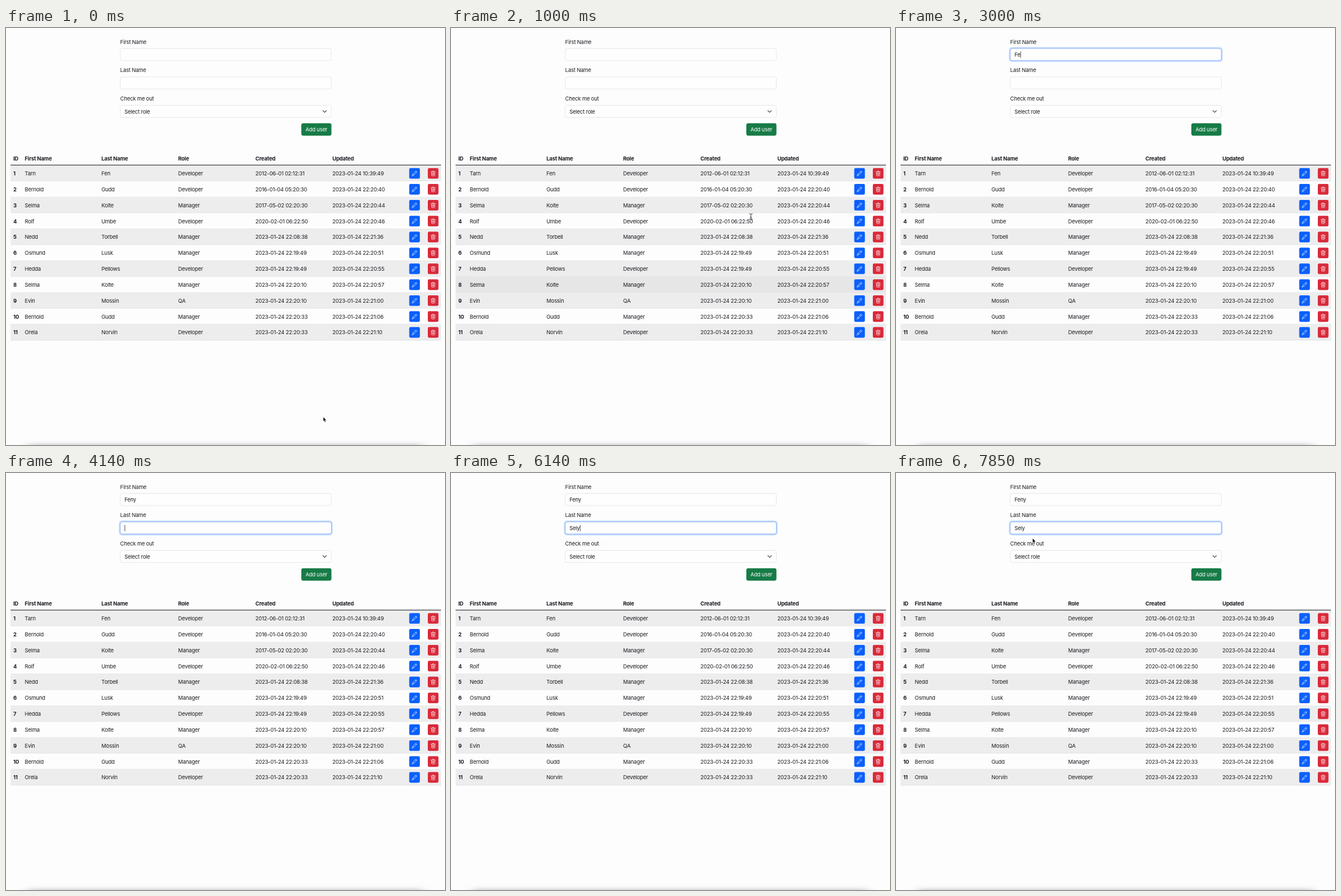
These frames come from a looping animation (767 by 730 pixels, 8 s). An HTML page:

```html
<!DOCTYPE html>
<html lang="en">
<head>
<meta charset="utf-8">
<title>User table</title>
<style>
html, body { margin: 0; width: 100%; height: 100%; overflow: hidden; background: #fdfdfe; }
svg { display: block; width: 767px; height: 730px; }
text { font: 9.3px Inter, "Liberation Sans", sans-serif; letter-spacing: -.02em; fill: #1a1b1f; }
.b { font-weight: 700; }
.w { fill: #fff; }
.field { fill: #fefefe; stroke: #dfe1e5; stroke-width: .8; }
.glow { fill: none; stroke: #c3daff; stroke-width: 2.3; }
.edge { fill: none; stroke: #86b4fb; stroke-width: .9; }
.icon { fill: none; stroke: #fff; stroke-width: 1.15; stroke-linejoin: round; stroke-linecap: round; }
</style>
</head>
<body>
<svg id="stage" viewBox="0 0 767 730"></svg>
<script>
const users = [
  ['Tarn', 'Fen', 'Developer', '2012-06-01 02:12:31', '10:39:49'],
  ['Bernold', 'Gudd', 'Developer', '2016-01-04 05:20:30', '22:20:40'],
  ['Selma', 'Kolte', 'Manager', '2017-05-02 02:20:30', '22:20:44'],
  ['Rolf', 'Umbe', 'Developer', '2020-02-01 06:22:50', '22:20:46'],
  ['Nedd', 'Torbell', 'Manager', '2023-01-24 22:08:38', '22:21:36'],
  ['Osmund', 'Lusk', 'Manager', '2023-01-24 22:19:49', '22:20:51'],
  ['Hedda', 'Pellows', 'Developer', '2023-01-24 22:19:49', '22:20:55'],
  ['Selma', 'Kolte', 'Manager', '2023-01-24 22:20:10', '22:20:57'],
  ['Evin', 'Mossin', 'QA', '2023-01-24 22:20:10', '22:21:00'],
  ['Bernold', 'Gudd', 'Manager', '2023-01-24 22:20:33', '22:21:06'],
  ['Orela', 'Norvin', 'Developer', '2023-01-24 22:20:33', '22:21:10']
];
const cols = [12.7, 32.8, 166.8, 300.8, 435.8, 570.3];
const heads = ['ID', 'First Name', 'Last Name', 'Role', 'Created', 'Updated'];
const TOP = 240.6, ROW = 27.84;

const text = (x, y, s, cls = '', id = '') => `<text x="${x}" y="${y}" class="${cls}" id="${id}">${s}</text>`;
const rect = (x, y, w, h, r, attrs) => `<rect x="${x}" y="${y}" width="${w}" height="${h}" rx="${r}" ${attrs}/>`;

function field(label, y, id) {
  return text(199.6, y - 8.2, label) +
    rect(199.6, y, 368.8, 21.2, 3.4, 'class="field"') +
    `<g id="${id}Focus">` + rect(198.4, y - 1.2, 371.2, 23.6, 4.4, 'class="glow"') +
    rect(199.6, y, 368.8, 21.2, 3.4, 'class="edge"') + '</g>';
}

function button(x, mid, color, icon) {
  return rect(x, mid - 9.3, 18.6, 18.6, 2.4, `fill="${color}"`) +
    `<use href="#${icon}" transform="translate(${x + 4.65} ${mid - 4.65}) scale(.58)"/>`;
}

function row(user, i) {
  const y = TOP + i * ROW, mid = y + ROW / 2, base = mid + 3.5;
  const cells = [i + 1, ...user.slice(0, 4), '2023-01-24 ' + user[4]];
  return rect(8, y, 752, ROW, 0, `fill="${i % 2 ? '#fdfdfe' : '#ededee'}" class="row"`) +
    rect(8, y + ROW - .6, 752, .7, 0, 'fill="#dcdee1"') +
    cells.map((c, k) => text(cols[k], base, c, k ? '' : 'b')).join('') +
    button(704.5, mid, '#0b60fb', 'pencil') + button(737, mid, '#d92a3a', 'trash');
}

const stage = document.getElementById('stage');
stage.innerHTML = `
<defs>
  <path id="pencil" class="icon" d="M.8 15.2l2-5L12.4.8l2.8 2.8L5.8 13zM10.6 2.8l2.6 2.6M3 10.2l2.8 2.8"/>
  <path id="trash" class="icon" d="M2.8 4l.5 10.2q.1 1.2 1.3 1.2h6.8q1.2 0 1.3-1.2L13.2 4M1.6 3.4h12.8M5.6 3V1h4.8v2M5.6 6.4v6M8 6.4v6M10.4 6.4v6"/>
  <filter id="soft" x="-10%" y="-100%" width="120%" height="300%"><feGaussianBlur stdDeviation="9 4"/></filter>
</defs>
<rect width="767" height="730" fill="#fdfdfe"/>
<rect x="38" y="730" width="690" height="20" fill="#b4b4b8" filter="url(#soft)"/>
${field('First Name', 35.8, 'first')}${field('Last Name', 85.6, 'last')}
${text(199.6, 127.2, 'Check me out')}${rect(199.6, 135.4, 368.8, 21.2, 3.4, 'class="field"')}
${text(207, 149.5, 'Select role')}
<path d="M553.6 144.6l3.1 3.1 3.1-3.1" fill="none" stroke="#343a40" stroke-width="1.15" stroke-linecap="round" stroke-linejoin="round"/>
${rect(516, 166.8, 52.6, 21.6, 3.4, 'fill="#177b46"')}${text(523.2, 181, 'Add user', 'w')}
${heads.map((h, k) => text(cols[k], 231.5, h, 'b')).join('')}
${users.map(row).join('')}
<rect x="8" y="239.4" width="752" height="1.2" fill="#303236"/>
<rect id="mark" x="206.6" y="91" width="18.6" height="11" fill="#d6d7d9"/>
${text(207, 49.8, '', '', 'firstText')}${text(207, 99.7, '', '', 'lastText')}
<rect id="caret" width=".8" height="11" fill="#222"/>
<g id="tip">${rect(202, 102.4, 36.4, 13, 4, 'fill="#202022"')}
  <text x="206.4" y="111.5" class="w" style="font-size:7.6px">Self</text>
  <path d="M229.7 107.2l3.8 3.8m0-3.8l-3.8 3.8" stroke="#b5b5b7" stroke-width=".8"/></g>
<g id="pointer">
  <circle id="ring" r="9.6" fill="#fff" fill-opacity=".4" stroke="#26272b" stroke-width="1.3"/>
  <path id="beam" d="M-2.8-4.8q2.3 0 2.8 1.2q.5-1.2 2.8-1.2M0-3.8v7.6M-2.8 4.8q2.3 0 2.8-1.2q.5 1.2 2.8 1.2M-1.2 1.4h2.4" fill="none" stroke="#222" stroke-width=".95"/>
  <path id="arrow" d="M0 0v8l1.8-1.6 1.3 3 1.5-.7-1.3-2.8h2.5z" fill="#000" stroke="#fff" stroke-width=".6"/>
</g>`;

const $ = id => document.getElementById(id);
const rows = stage.querySelectorAll('.row');
const show = (id, v) => $(id).setAttribute('opacity', +v);

const TICK = 8000 / 56;
// tick, x, y, shape
const path = [
  [0, 554.2, 680.8, 'arrow'], [5, 561, 505, 'beam'], [6, 563.8, 447, 'beam'],
  [7, 524, 330, 'beam'], [8, 442, 200, 'arrow'], [9, 340, 112, 'arrow'],
  [10, 262, 63, 'arrow'], [11, 232, 49.5, 'beam'], [12, 231.2, 48.8, 'beam'], [19, 0, 0, ''],
  [47, 271, 76.6, 'beam'], [48, 270.2, 76.8, 'beam'], [49, 261, 88, 'beam'], [50, 247, 101, 'beam'],
  [51, 238, 107, 'arrow'], [52, 232, 108, 'arrow'], [53, 231, 108.5, 'arrow'],
  [54, 233, 110, 'arrow'], [55, 238.6, 114.2, 'arrow']
];
const clicks = { 11: .5, 12: 1, 13: .5, 53: 1 };
const typed = (word, ticks, n) => word.slice(0, ticks.filter(t => n >= t).length);
const at = n => path.filter(p => p[0] <= n).pop();
const ramp = (n, from) => Math.min(1, Math.max(0, (n - from + 1) / 2));

function draw(n) {
  const [, x, y, shape] = at(n);
  $('pointer').setAttribute('transform', `translate(${x} ${y})`);
  show('beam', shape === 'beam');
  show('arrow', shape === 'arrow');
  show('ring', clicks[n] || 0);

  // row highlight trails the pointer by one tick
  const hover = n ? Math.floor((at(n - 1)[2] - TOP) / ROW) : -1;
  rows.forEach((r, i) => r.setAttribute('fill', i === hover ? '#e6e6e7' : i % 2 ? '#fdfdfe' : '#ededee'));

  const second = ramp(n, 27);
  show('firstFocus', ramp(n, 11) * (1 - second));
  show('lastFocus', second);
  $('firstText').textContent = typed('Feny', [19, 21, 23, 25], n);
  $('lastText').textContent = typed('Sely', [35, 37, 40, 43], n);

  const inLast = n >= 27, box = $(inLast ? 'lastText' : 'firstText');
  const width = box.textContent ? box.getComputedTextLength() : 0;
  $('caret').setAttribute('x', 207.3 + width);
  $('caret').setAttribute('y', inLast ? 91 : 41);
  const blink = n === 16 || n === 33 ? .5 : n === 17 || n === 18 || n === 34 ? 0 : 1;
  show('caret', n >= 11 && n < 46 ? blink : 0);

  const hint = n >= 46 && n < 54;
  show('tip', hint);
  show('mark', hint);
}

let last = -1;
const start = performance.now();
function loop(now) {
  const n = Math.floor(((Math.max(0, now - start) % 8000) + 10) / TICK) % 56;
  if (n !== last) draw(last = n);
  requestAnimationFrame(loop);
}
draw(0);
requestAnimationFrame(loop);
</script>
</body>
</html>
```
